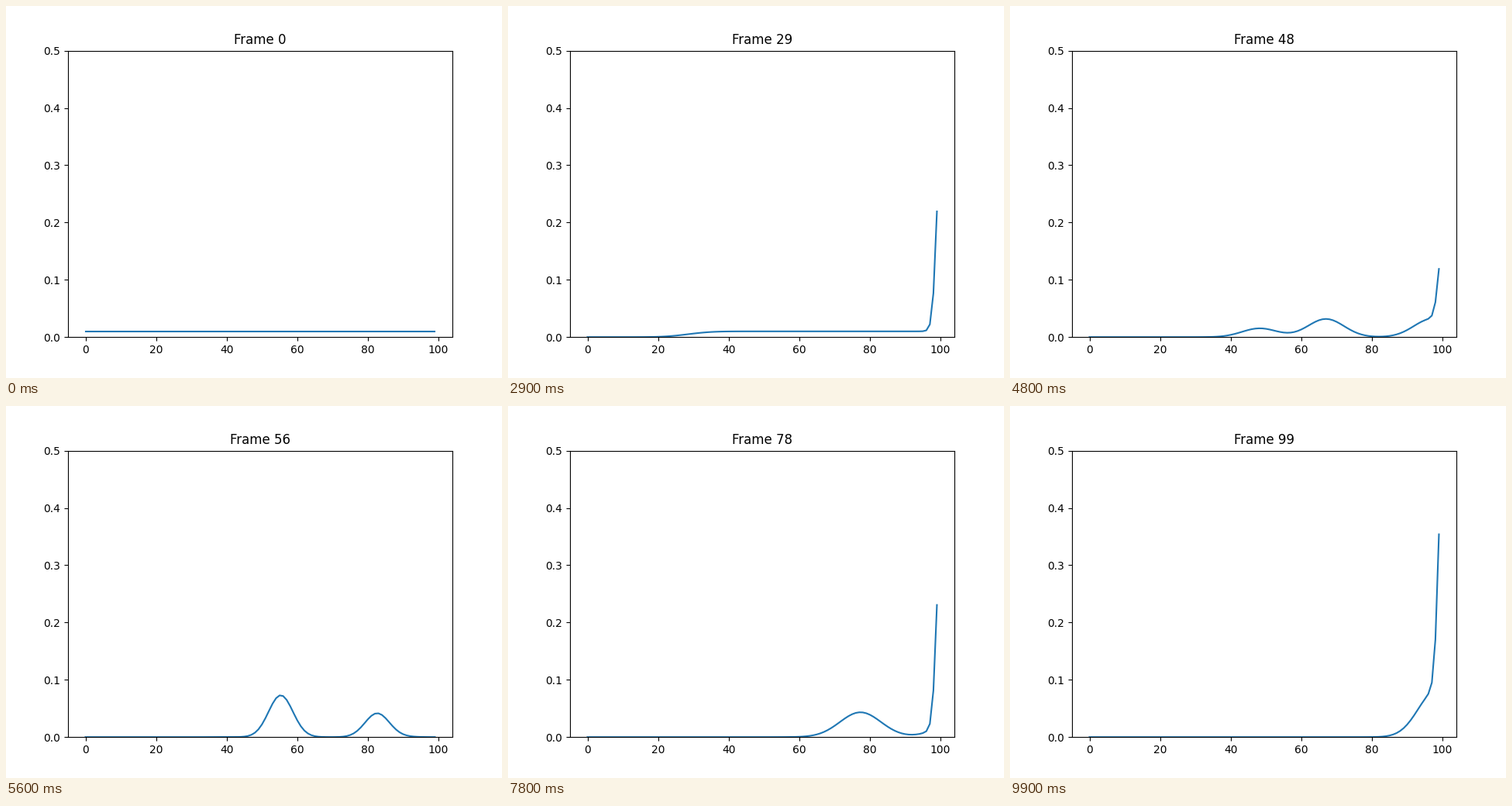
A matplotlib script for the animation above (10 s loop, 640 by 480 pixels).

```python
import numpy as np
import matplotlib.pyplot as plt
from matplotlib.animation import FuncAnimation

CELLS = 100
FRAMES = 100
DOORS = (30, 50, 80)
SENSE_STEPS = (31, 51, 81)
MOVE_SIGMA = 1.0
SENSE_SIGMA = 3.0

x = np.arange(CELLS)


def bell(d, sigma):
    return np.exp(-0.5 * (d / sigma) ** 2)


# Column j holds the chance of each cell after moving one step from cell j
motion = bell(x[:, None] - (x[None, :] + 1), MOVE_SIGMA)
motion /= motion.sum(axis=0)

door_likelihood = sum(bell(x - d, SENSE_SIGMA) for d in DOORS)


def run_filter():
    belief = np.full(CELLS, 1 / CELLS)
    history = [belief]
    for step in range(1, FRAMES):
        belief = motion @ belief
        if step in SENSE_STEPS:
            belief = belief * door_likelihood
            belief /= belief.sum()
        history.append(belief)
    return history


beliefs = run_filter()

fig, ax = plt.subplots(figsize=(6.4, 4.8), dpi=100)
line, = ax.plot(x, beliefs[0])
ax.set_ylim(0, 0.5)
title = ax.set_title("Frame 0")


def update(i):
    line.set_ydata(beliefs[i])
    title.set_text(f"Frame {i}")
    return line, title


anim = FuncAnimation(fig, update, frames=FRAMES, interval=100,
                     repeat=True, repeat_delay=0, blit=False)
plt.show()
```
